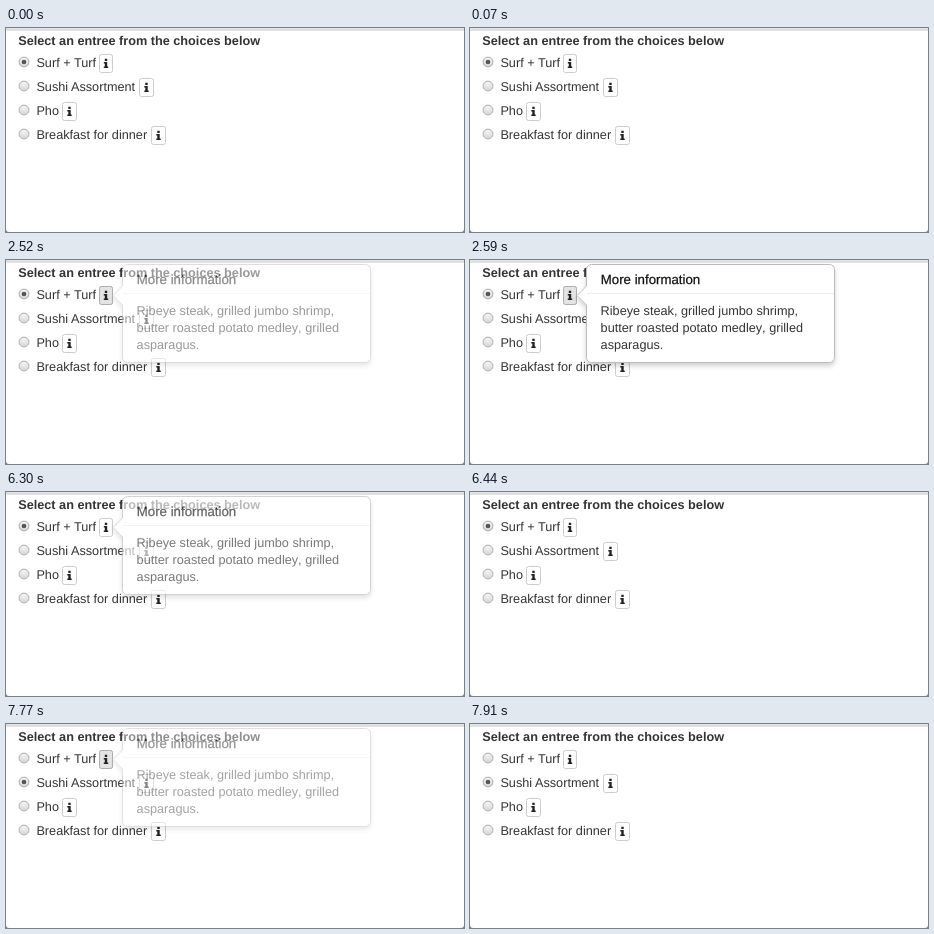
An HTML page for the animation above (8000 ms loop, 458 by 204 pixels).

```html
<!DOCTYPE html>
<html lang="en">
<head>
<meta charset="utf-8">
<title>Entree choices</title>
<style>
  html, body { margin: 0; width: 100%; height: 100%; overflow: hidden; background: #fff; }
  svg { display: block; width: 100%; height: 100%; }
  text { font: 12.7px "Liberation Sans", Arial, sans-serif; fill: #333; text-rendering: geometricPrecision; }
  .head { font-weight: bold; }
  .pop text { font-kerning: none; }
  .pop .title { font-size: 13.25px; fill: #111; stroke: #111; stroke-width: .25px; }
  .box { fill: #fff; stroke: #ccc; }
  .ring { fill: url(#knob); stroke: #acacac; }
  .dot { fill: #555; }

  /* every state change is a hard cut */
  .hover, .pop, .press, .first, .second { animation: 8s step-end infinite; }
  .hover { animation-name: hover; }
  .pop { animation-name: pop; }
  .press { animation-name: press; }
  .first { animation-name: first; }
  .second { animation-name: second; }

  @keyframes hover {
    0%, 78.75%, 98%, 100% { opacity: 0; }
    31.5%, 96.25% { opacity: 1; }
  }
  @keyframes pop {
    0% { opacity: 0; }
    31.5% { opacity: .5; }
    32.375% { opacity: 1; }
    78.75% { opacity: .66; }
    79.625% { opacity: .2; }
    80.5% { opacity: 0; }
    97.125% { opacity: .45; }
    98% { opacity: .2; }
    98.875%, 100% { opacity: 0; }
  }
  @keyframes press {
    0%, 89.25%, 100% { opacity: 0; }
    86.625% { opacity: 1; }
  }
  @keyframes first {
    0% { opacity: 1; }
    89.25%, 100% { opacity: 0; }
  }
  @keyframes second {
    0% { opacity: 0; }
    89.25%, 100% { opacity: 1; }
  }
</style>
</head>
<body>
<svg viewBox="0 0 458 204">
  <defs>
    <linearGradient id="knob" x2="0" y2="1">
      <stop offset="0" stop-color="#f4f4f4"/>
      <stop offset="1" stop-color="#d8d8d8"/>
    </linearGradient>
    <filter id="shadow" x="-10%" y="-10%" width="120%" height="130%">
      <feDropShadow dx="0" dy="3" stdDeviation="2.5" flood-opacity=".18"/>
    </filter>
    <circle id="radio" class="ring" cx="18" cy="34" r="4.9"/>
    <circle id="mark" class="dot" cx="18" cy="34" r="2.3"/>
    <path id="glyph" fill="#222" d="M-1.2-5.2h2.4v2.2h-2.4zM-2.2-2h3.4v4.600h1v1.500h-4.400v-1.500h1v-3.100h-1z"/>
    <g id="info">
      <rect class="box" x="-7" y="-9.5" width="14" height="18" rx="2"/>
      <use href="#glyph"/>
    </g>
  </defs>

  <rect width="458" height="204" fill="#fff"/>
  <rect width="458" height="3" fill="#e0e0e0"/>
  <path fill="#777" d="M0 201q0 3 3 3H0zM458 201q0 3-3 3h3z"/>

  <text class="head" x="12.2" y="17">Select an entree from the choices below</text>

  <g>
    <use href="#radio"/>
    <use href="#mark" class="first"/>
    <text x="30.4" y="39">Surf + Turf</text>
    <rect class="box" x="93.5" y="26.5" width="13" height="18" rx="2"/>
    <rect class="hover" x="93.5" y="26.5" width="13" height="18" rx="2" fill="#e3e3e3" stroke="#adadad"/>
    <use href="#glyph" x="100" y="36"/>
  </g>
  <g transform="translate(0 24)">
    <use href="#radio"/>
    <path class="press" fill="#c6c6c6" d="M13.6 34h8.8a4.4 4.4 0 0 1-8.8 0z"/>
    <use href="#mark" class="second"/>
    <text x="30.4" y="39">Sushi Assortment</text>
    <use href="#info" x="140.5" y="36"/>
  </g>
  <g transform="translate(0 48)">
    <use href="#radio"/>
    <text x="30.4" y="39">Pho</text>
    <use href="#info" x="63.5" y="36"/>
  </g>
  <g transform="translate(0 72)">
    <use href="#radio"/>
    <text x="30.4" y="39">Breakfast for dinner</text>
    <use href="#info" x="152.5" y="36"/>
  </g>

  <g class="pop">
    <path d="M121.5 4.5H359.5a5 5 0 0 1 5 5V97.5a5 5 0 0 1-5 5H121.5a5 5 0 0 1-5-5V45l-9.5-9.5 9.5-9.5V9.5a5 5 0 0 1 5-5z"
          fill="#fff" stroke="#bbb" filter="url(#shadow)"/>
    <path d="M117 33.5H364" stroke="#eee"/>
    <text class="title" x="130.8" y="24">More information</text>
    <text x="130.6" y="55">Ribeye steak, grilled jumbo shrimp,</text>
    <text x="130.6" y="72">butter roasted potato medley, grilled</text>
    <text x="130.6" y="89">asparagus.</text>
  </g>
</svg>
</body>
</html>
```
